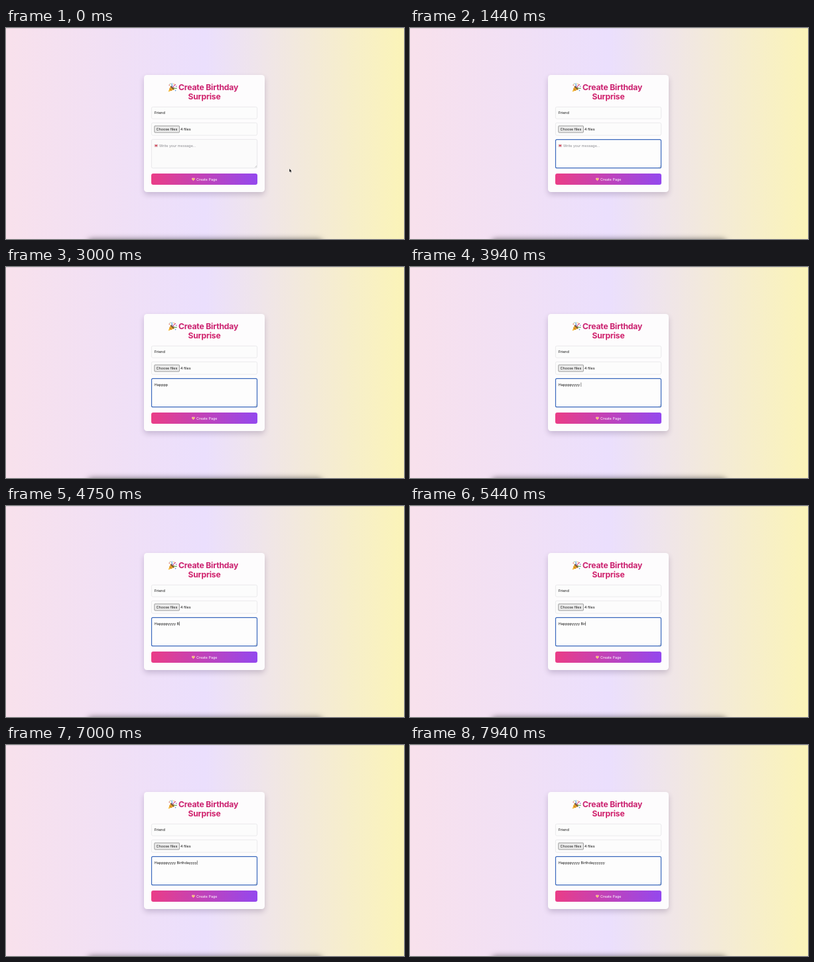
Animation of 600x319 px, one loop 8000 ms. Source, as an HTML page with a canvas:

```html
<!DOCTYPE html>
<html lang="en">
<head>
<meta charset="utf-8">
<title>Create Birthday Surprise</title>
<style>
html, body { margin: 0; width: 100%; height: 100%; overflow: hidden; background: #ebdffd; }
canvas { display: block; width: 100vw; height: 100vh; }
</style>
</head>
<body>
<canvas id="stage"></canvas>
<script>
const W = 600, H = 319, LOOP = 8000;
const canvas = document.getElementById('stage');
const ctx = canvas.getContext('2d');
const FONT = 'Inter, "Open Sans", sans-serif';
let scale = 1;

const MESSAGE = 'Happppyyyy Birthdayyyyyy';
// Time of each key press, one per character of MESSAGE.
const KEYS = [1850, 2020, 2140, 2250, 2350, 2450, 3190, 3340, 3470, 3600, 3800,
  4560, 4900, 5230, 5520, 5720, 5960, 6200, 6420, 6580, 6720, 6850, 7080, 7200];
const FOCUS = 900;
const BLINK = 500;

function resize() {
  const dpr = window.devicePixelRatio || 1;
  canvas.width = Math.round(innerWidth * dpr);
  canvas.height = Math.round(innerHeight * dpr);
  scale = canvas.width / W;
}

function box(x, y, w, h, r, fill, stroke, line = 0.7) {
  ctx.beginPath();
  ctx.roundRect(x, y, w, h, r);
  if (fill) { ctx.fillStyle = fill; ctx.fill(); }
  if (stroke) { ctx.strokeStyle = stroke; ctx.lineWidth = line; ctx.stroke(); }
}

function shape(points, fill, stroke, line = 0.5) {
  ctx.beginPath();
  points.forEach(([x, y]) => ctx.lineTo(x, y));
  ctx.closePath();
  if (stroke) { ctx.strokeStyle = stroke; ctx.lineWidth = line; ctx.stroke(); }
  ctx.fillStyle = fill;
  ctx.fill();
}

function dot(x, y, r, fill) {
  ctx.beginPath();
  ctx.arc(x, y, r, 0, Math.PI * 2);
  ctx.fillStyle = fill;
  ctx.fill();
}

function text(str, x, y, color, size = 5.4, weight = 400, align = 'left') {
  ctx.font = `${weight} ${size}px ${FONT}`;
  ctx.textAlign = align;
  ctx.fillStyle = color;
  ctx.fillText(str, x, y);
}

function gradient(x0, x1, colors) {
  const g = ctx.createLinearGradient(x0, 0, x1, 0);
  colors.forEach((c, i) => g.addColorStop(i / (colors.length - 1), c));
  return g;
}

function shadow(color, blur, dy) {
  ctx.shadowColor = color;
  ctx.shadowBlur = blur * scale;
  ctx.shadowOffsetY = dy * scale;
}

function background() {
  ctx.fillStyle = gradient(0, W, ['#f8e1ec', '#ebdffd', '#fbf4b8']);
  ctx.fillRect(0, 0, W, H);
  ctx.fillStyle = 'rgba(120,120,130,.22)';
  ctx.fillRect(0, 0, W, 0.8);
  ctx.save();
  shadow('rgba(0,0,0,.5)', 9, 0);
  box(122, 319, 356, 30, 8, '#999');
  ctx.restore();
}

function popper() {
  ctx.save();
  ctx.translate(244, 83);
  shape([[0.6, 13.4], [4.1, 4.8], [9.4, 10]], '#f2b632');
  shape([[2.2, 9.5], [3, 7.6], [6.6, 11.2], [4.8, 11.9]], '#d88a22');
  ctx.save();
  ctx.translate(6.8, 7.4);
  ctx.rotate(Math.PI / 4);
  ctx.beginPath();
  ctx.ellipse(0, 0, 3.8, 1.5, 0, 0, Math.PI * 2);
  ctx.fillStyle = '#8d5a2b';
  ctx.fill();
  ctx.restore();
  ctx.lineWidth = 1.1;
  ctx.lineCap = 'round';
  const streamer = (color, x, y, ...curve) => {
    ctx.beginPath();
    ctx.moveTo(x, y);
    ctx.bezierCurveTo(...curve);
    ctx.strokeStyle = color;
    ctx.stroke();
  };
  streamer('#4a90d9', 6, 6.2, 8, 4, 4.8, 3, 6.2, 0.9);
  streamer('#d8417c', 7.2, 7, 9.4, 5.8, 8.6, 3, 11.6, 2.6);
  streamer('#5aa447', 8, 8, 10, 6.6, 11, 9.8, 13.2, 8);
  dot(2.3, 3.2, 0.8, '#d84a3c');
  dot(9, 1.4, 0.75, '#f0b53a');
  dot(12.7, 5.2, 0.8, '#7c5bd0');
  dot(11.5, 11.6, 0.8, '#4a90d9');
  dot(3.6, 1.2, 0.6, '#66b04d');
  ctx.restore();
}

function letter(x, y) {
  box(x, y, 4.8, 3.6, 0.4, '#e9c6cb', '#b98a90', 0.3);
  dot(x + 1.8, y + 1.4, 0.85, '#cf3348');
  dot(x + 3, y + 1.4, 0.85, '#cf3348');
  shape([[x + 1, y + 1.7], [x + 3.8, y + 1.7], [x + 2.4, y + 3.2]], '#cf3348');
}

function heart(x, y) {
  dot(x - 1.1, y - 0.8, 1.35, '#f4a9bd');
  dot(x + 1.1, y - 0.8, 1.35, '#f4a9bd');
  shape([[x - 2.4, y - 0.3], [x + 2.4, y - 0.3], [x, y + 2.5]], '#f4a9bd');
  ctx.fillStyle = '#f6d24d';
  ctx.fillRect(x - 0.4, y - 1.4, 0.8, 3.4);
  ctx.fillRect(x - 2.2, y - 0.8, 4.4, 0.8);
}

function card() {
  ctx.save();
  shadow('rgba(40,20,60,.2)', 9, 4);
  box(208, 71, 182, 177, 4.5, '#fdfcfd');
  ctx.restore();

  popper();
  ctx.letterSpacing = '-0.2px';
  text('Create Birthday', 260, 94.4, '#cb2270', 12.2, 700);
  text('Surprise', 299, 108.4, '#d0226d', 12.2, 700, 'center');
  ctx.letterSpacing = '0px';

  const edge = '#e3e3e6';
  box(219.4, 119.4, 159.2, 17.8, 2, '#fcfcfc', edge);
  text('Friend', 223.8, 130.2, '#111');

  box(219.4, 143.4, 159.2, 18.8, 2, '#fcfcfc', edge);
  box(223.8, 148, 37.6, 10, 0.8, '#ececec', '#777', 0.7);
  text('Choose files', 226.6, 155, '#111');
  text('4 files', 263, 155, '#111');

  box(219, 220, 160, 17, 3, gradient(219, 379, ['#ea3d87', '#9448ee']));
  heart(282.4, 228.7);
  text('Create Page', 287, 230.8, '#fff');
}

function messageBox(t) {
  const focused = t >= FOCUS;
  if (focused) box(219.5, 168.7, 159, 43, 2, '#fdfdfd', '#3b69bd', 1.2);
  else box(219.4, 168.4, 159.2, 43.4, 2, '#fbfbfb', '#e0e0e3');

  ctx.strokeStyle = '#888';
  ctx.lineWidth = 0.4;
  ctx.beginPath();
  for (const d of [1.3, 2.8]) {
    ctx.moveTo(378 - d, 210.8);
    ctx.lineTo(378, 210.8 - d);
  }
  ctx.stroke();

  const count = KEYS.filter(k => k <= t).length;
  const typed = MESSAGE.slice(0, count);
  if (count) {
    text(typed, 223.8, 179.8, '#111');
  } else {
    letter(223.9, 176.1);
    text('Write your message...', 231, 179.8, '#8b8b90');
  }

  const since = t - (count ? KEYS[count - 1] : FOCUS);
  if (focused && Math.floor(since / BLINK) % 2 === 0) {
    ctx.font = `400 5.4px ${FONT}`;
    ctx.fillStyle = '#222';
    ctx.fillRect(223.9 + ctx.measureText(typed).width, 174.6, 0.5, 6.4);
  }
}

function pointer(t) {
  if (t >= FOCUS + 150) return;
  const p = Math.min(1, Math.max(0, (t - 150) / 600));
  const ease = p * p * (3 - 2 * p);
  const x = 427.3 - 92 * ease, y = 212.8 - 20 * ease;
  if (x < 379) {
    ctx.strokeStyle = '#333';
    ctx.lineWidth = 0.6;
    ctx.beginPath();
    ctx.moveTo(x, y - 2.6);
    ctx.lineTo(x, y + 2.6);
    ctx.stroke();
    return;
  }
  const arrow = [[0, 0], [0, 5], [1.1, 4], [1.9, 5.8], [2.7, 5.4], [1.9, 3.7], [3.4, 3.6]];
  shape(arrow.map(([a, b]) => [x + a, y + b]), '#111', '#fff', 0.9);
}

function draw(now) {
  const t = now % LOOP;
  ctx.setTransform(scale, 0, 0, canvas.height / H, 0, 0);
  background();
  card();
  messageBox(t);
  pointer(t);
}

let start;
function tick(now) {
  start ??= now;
  draw(now - start);
  requestAnimationFrame(tick);
}

addEventListener('resize', resize);
resize();
draw(0);
requestAnimationFrame(tick);
</script>
</body>
</html>
```
